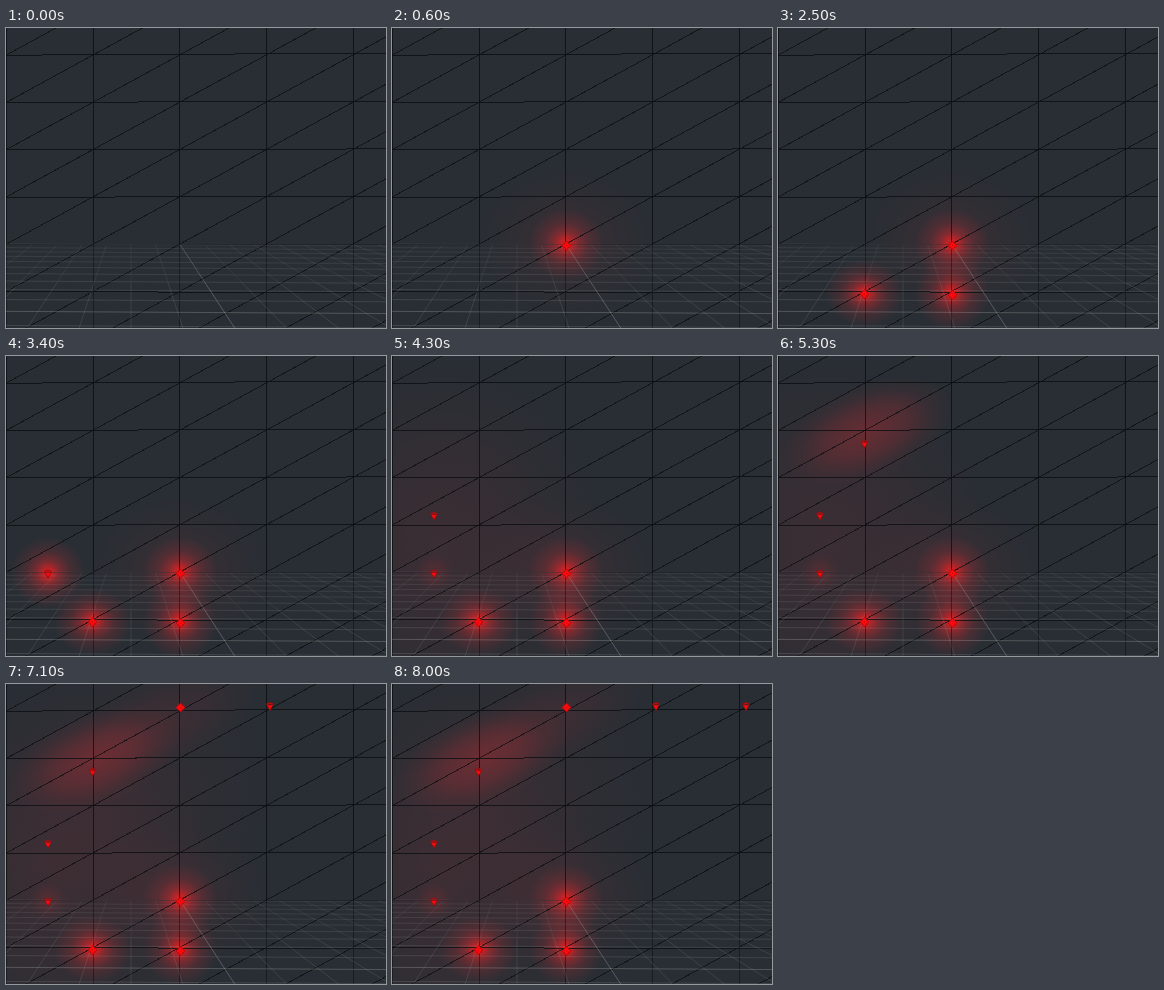
Write an HTML page that moves like this. It is 380 px wide and 300 px high and loops after 9100 ms.

```html
<!DOCTYPE html>
<html>
<head>
<meta charset="utf-8">
<style>
html, body { margin: 0; width: 100%; height: 100%; overflow: hidden; background: #292e34; }
svg { display: block; }
</style>
</head>
<body>
<svg id="stage" width="380" height="300" viewBox="0 0 380 300">
  <defs>
    <radialGradient id="spot">
      <stop offset="0" stop-color="#ff1b1e" stop-opacity=".88"/>
      <stop offset=".14" stop-color="#ff1e21" stop-opacity=".66"/>
      <stop offset=".32" stop-color="#f8262a" stop-opacity=".38"/>
      <stop offset=".58" stop-color="#e62a30" stop-opacity=".17"/>
      <stop offset="1" stop-color="#d83038" stop-opacity="0"/>
    </radialGradient>
    <radialGradient id="haze">
      <stop offset="0" stop-color="#e02c32" stop-opacity="1"/>
      <stop offset=".45" stop-color="#e02c32" stop-opacity=".62"/>
      <stop offset=".75" stop-color="#e02c32" stop-opacity=".2"/>
      <stop offset="1" stop-color="#e02c32" stop-opacity="0"/>
    </radialGradient>
  </defs>
  <rect width="380" height="300" fill="#292e34"/>
  <g id="glows"></g>
  <g id="wall" stroke="#0c0e11" fill="none" shape-rendering="crispEdges"></g>
  <g id="floor" stroke="#a3a7a5" fill="none"></g>
  <g id="markers"></g>
</svg>
<script>
const LOOP = 9100;
const layer = id => document.getElementById(id);
const timed = [];

function add(parent, tag, attrs) {
  const el = document.createElementNS('http://www.w3.org/2000/svg', tag);
  for (const key in attrs) el.setAttribute(key, attrs[key]);
  layer(parent).appendChild(el);
  return el;
}

function line(parent, x1, y1, x2, y2, opacity) {
  add(parent, 'line', { x1, y1, x2, y2, 'stroke-opacity': opacity });
}

function show(el, from, to = LOOP) {
  timed.push({ el, from, to });
}

function buildWall() {
  const cellW = 86.6, cellH = 47.3, top = 27.2;
  for (let i = 0; i < 5; i++) {
    const x = 0.7 + i * cellW;
    line('wall', x, 0, x, 218, .8);
    line('wall', x, 218, x, 300, .55);
  }
  for (let i = 0; i < 6; i++) {
    const y = top + i * cellH;
    line('wall', 0, y, 380, y + (i - 3.6) * .55, i === 4 ? .3 : .8);
  }
  for (let i = 0; i < 11; i++) {
    const y = top + i * cellH;
    line('wall', 0, y, 380, y - 380 * cellH / cellW, .75);
  }
}

function buildFloor() {
  const eyeX = 125, eyeY = 141.5, top = 217, gap = 24.7;
  for (let k = -16; k <= 22; k++) {
    const at = y => eyeX + k * gap * (y - eyeY) / (top - eyeY);
    const strong = k === 2;
    line('floor', at(top), top, at(255), 255, strong ? .32 : .1);
    line('floor', at(255), 255, at(300), 300, strong ? .38 : .16);
  }
  for (let i = 0; i < 12; i++) {
    const y = eyeY + 1 / (.00638 + i * .00063);
    line('floor', 0, y - .8, 380, y + 1.4, i === 1 ? .33 : .2 - i * .009);
  }
}

function spot(x, y, rx, ry, from, to) {
  show(add('glows', 'ellipse', { cx: x, cy: y, rx, ry, fill: 'url(#spot)' }), from, to);
}

function haze(x, y, rx, ry, angle, opacity, from, to) {
  show(add('glows', 'ellipse', {
    cx: x, cy: y, rx, ry, opacity, fill: 'url(#haze)',
    transform: `rotate(${angle} ${x} ${y})`
  }), from, to);
}

// Hanging markers are seen from below, the others face on.
function marker(x, y, from, hanging) {
  const d = hanging
    ? 'M-3.5-2.5L0-4L3.5-2.5L0 4ZM0-4V4M-3.5-2.5L0-1L3.5-2.5'
    : 'M-4.5 0L0-4.5L4.5 0L0 4.5ZM-3-3L3 3M3-3L-3 3';
  const el = add('markers', 'path', {
    d, transform: `translate(${x} ${y})`,
    fill: '#f60a0c', stroke: hanging ? '#8c1013' : '#b40a0d', 'stroke-width': .8
  });
  const core = add('markers', 'path', {
    d: hanging ? 'M-2-1H2L0 3Z' : 'M-3 0L0-3L3 0L0 3ZM-.7 0L0 .7L.7 0L0-.7Z',
    transform: `translate(${x} ${y})`, fill: '#ff0a0c', 'fill-rule': 'evenodd'
  });
  show(el, from);
  show(core, from);
}

function buildLights() {
  haze(174, 214, 90, 75, 0, .08, 600);
  haze(50, 190, 160, 185, 0, .1, 4300);
  haze(120, 110, 150, 150, 0, .05, 6200);

  spot(174, 216, 38, 36, 600);
  spot(174, 265, 37, 38, 1500);
  spot(86.5, 265, 39, 34, 2500);
  spot(42, 217, 37, 36, 3400, 4300);
  haze(42, 217, 20, 20, 0, .16, 4300);

  haze(90, 75, 90, 46, -22, .32, 5200);
  haze(172, 25, 98, 52, -23, .62, 6200, 7100);
  haze(160, 35, 105, 46, -23, .1, 7100);

  marker(174.5, 217.5, 600);
  marker(174.5, 267, 1600);
  marker(86.5, 266, 2500);
  marker(42, 218, 3400, true);
  marker(42, 160, 4300, true);
  marker(86.5, 88, 5300, true);
  marker(174.5, 23.5, 6200);
  marker(264, 22.5, 7100, true);
  marker(354, 22.5, 8000, true);
}

function render(t) {
  for (const { el, from, to } of timed) {
    el.style.display = t >= from && t < to ? '' : 'none';
  }
}

buildWall();
buildFloor();
buildLights();

const start = performance.now();
function tick(now) {
  render(Math.max(0, now - start) % LOOP);
  requestAnimationFrame(tick);
}
render(0);
requestAnimationFrame(tick);
</script>
</body>
</html>
```
